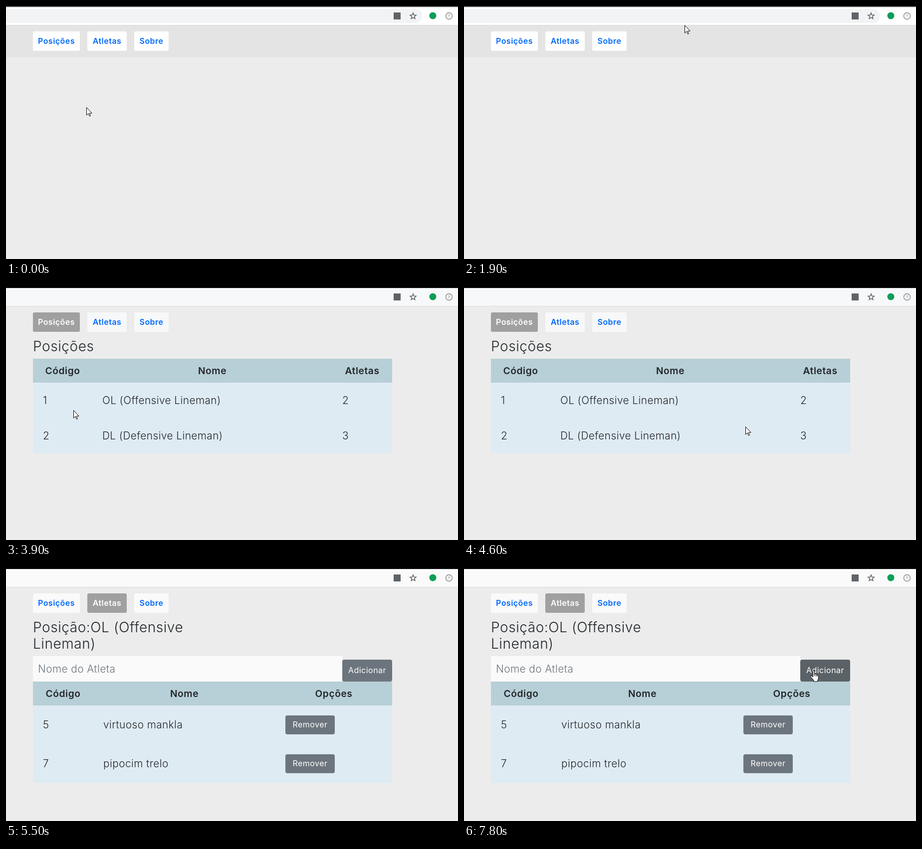
An HTML page that plays this animation: 906 px wide and 508 px high, repeating every 8 s.

```html
<!DOCTYPE html>
<html lang="pt">
<head>
<meta charset="utf-8">
<style>
html, body { margin: 0; width: 100%; height: 100%; overflow: hidden; background: #ececec; }
svg { display: block; }
text { font: 300 20.8px Inter, "Open Sans", sans-serif; letter-spacing: .02em; fill: #212529; }
.title { font-size: 28px; }
.head { font-weight: 600; font-size: 19.2px; letter-spacing: .03em; text-anchor: middle; }
.nav { font-weight: 600; font-size: 16px; letter-spacing: .03em; text-anchor: middle; fill: #0069ff; }
.btn { font-weight: 400; font-size: 16px; letter-spacing: .03em; text-anchor: middle; fill: #fff; }
.hint { fill: #6c757d; }
.help { font-size: 8px; font-weight: 700; letter-spacing: 0; text-anchor: middle; fill: #9e9e9e; }
</style>
</head>
<body>
<svg width="906" height="508" viewBox="0 0 906 508">
  <rect width="906" height="508" fill="#ececec"/>
  <rect id="bar" width="906" height="38"/>
  <rect id="pill" x="-20" y="6" width="854" height="28" rx="14" fill="#f1f3f4"/>
  <rect id="edge" width="906" height="2"/>
  <rect y="38" width="906" height="1" fill="#dadbdc"/>
  <rect x="777" y="13" width="14" height="14" fill="#5f6368"/>
  <path id="star" fill="none" stroke="#5f6368" stroke-width="1.5"/>
  <circle cx="855.5" cy="19.5" r="7" fill="#0f9d58"/>
  <circle cx="888" cy="20" r="6.5" fill="none" stroke="#9e9e9e" stroke-width="1.8"/>
  <text x="888" y="23" class="help">?</text>
  <rect id="band" y="39" width="906" height="64" fill="#e4e4e4"/>
  <g id="nav"></g>
  <g id="positions"></g>
  <g id="athletes"></g>
  <g id="arrow" fill="#fff" stroke="#000">
    <path d="M.5.8v15.4l3.6-3.4 2.4 5.6 2-.9-2.3-5.3h5z"/>
  </g>
  <g id="hand" fill="#fff" stroke="#000" stroke-linejoin="round">
    <path d="M5.5 14V2a1.5 1.5 0 0 1 3 0v6q1.8-1 3 .8 1.8-.7 2.6 1 2.2-.2 2.4 1.5v5q0 2-1.5 3.5v3.2h-8v-2.5L.8 13.5q-.6-2 1.2-2 1.5.3 3.5 2.5z"/>
    <path d="M8.5 8v4M11.5 9v3.5M14 10v3" fill="none"/>
  </g>
</svg>
<script>
const $ = id => document.getElementById(id);
const rect = (x, y, w, h, fill, more = '') =>
  `<rect x="${x}" y="${y}" width="${w}" height="${h}" fill="${fill}" ${more}/>`;
const text = (x, y, s, cls = '') => `<text x="${x}" y="${y}" class="${cls}">${s}</text>`;
const button = (x, y, w, h, label, base, id = '') =>
  rect(x, y, w, h, '#6c757d', `rx="4" id="${id}"`) + text(x + w / 2, base, label, 'btn');

const starPoint = (_, i) => {
  const r = i % 2 ? 2.8 : 6.4, a = i * Math.PI / 5;
  return [816 + r * Math.sin(a), 20.3 - r * Math.cos(a)];
};
$('star').setAttribute('d', 'M' + Array.from({ length: 10 }, starPoint).join('L') + 'z');

const tabs = [[54, 94, 'Posições'], [163, 79, 'Atletas'], [257, 69, 'Sobre']];
$('nav').innerHTML = tabs.map(([x, w, label]) =>
  rect(x, 51, w, 39, '#fff', 'rx="3"') + text(x + w / 2, 76, label, 'nav')).join('');

const table = (y, h) => rect(54, y + 48, 720, h, '#dfebf3') + rect(54, y, 720, 48, '#b7cfd6');
const heads = (y, labels, xs) => labels.map((s, i) => text(xs[i], y, s, 'head')).join('');
const positionRow = (y, code, name, count) => text(74, y, code) + text(193, y, name) + text(674, y, count);
const athleteRow = (y, code, name) =>
  text(74, y, code) + text(195, y, name) + button(560, y - 26, 99, 38, 'Remover', y - 2);

// Columns spread differently while the table is still empty
const labels = ['Código', 'Nome', 'Atletas'];
$('positions').innerHTML = text(54, 129, 'Posições', 'title') +
  '<g id="empty">' + table(144, 0) + heads(175, labels, [179, 415, 651]) + '</g>' +
  '<g id="filled">' + table(144, 142) + heads(175, labels, [113.5, 413.5, 714]) +
  positionRow(235, 1, 'OL (Offensive Lineman)', 2) +
  positionRow(306, 2, 'DL (Defensive Lineman)', 3) + '</g>';

$('athletes').innerHTML = text(54, 129, 'Posição:OL (Offensive', 'title') +
  text(54, 162, 'Lineman)', 'title') +
  rect(54, 177, 620, 51, '#fafafa') + text(64, 210, 'Nome do Atleta', 'hint') +
  button(674, 184, 100, 44, 'Adicionar', 211, 'add') + table(228, 156) +
  heads(259, ['Código', 'Nome', 'Opções'], [114.5, 357.5, 657]) +
  athleteRow(322, 5, 'virtuoso mankla') + athleteRow(400, 7, 'pipocim trelo');

// Pointer path: time in tenths of a second, x, y
const path = [
  [6, 161, 203], [7, 102, 122], [8, 102, 122], [10, 86, 125], [14, 582, 120], [17, 440, 93],
  [18, 440, 93], [19, 442, 38], [22, 133, 94], [23, 133, 94], [26, 93, 79], [28, 94, 78],
  [34, 94, 78], [35, 61, 68], [39, 135, 247], [43, 217, 262], [44, 300, 300], [47, 696, 270],
  [48, 600, 171], [50, 345, 230], [51, 345, 230], [53, 351, 223], [57, 351, 223], [58, 345, 228],
  [66, 94, 356], [68, 330, 407], [70, 605, 345], [72, 545, 284], [73, 620, 212], [74, 620, 212],
  [75, 690, 210], [78, 700, 205]
];
function pointer(k) {
  const i = Math.max(1, path.findIndex(p => p[0] >= k));
  const [a, ax, ay] = path[i - 1], [b, bx, by] = path[i];
  const u = Math.max(0, (k - a) / (b - a));
  return [Math.round(ax + (bx - ax) * u), Math.round(ay + (by - ay) * u)];
}

const inside = (x, y, l, t, w, h) => x >= l && x < l + w && y >= t && y < t + h;
const show = (id, on) => $(id).style.display = on ? '' : 'none';

function draw(now) {
  const k = Math.floor(now % 8000 / 100);
  const page = k < 32 ? 0 : k < 55 ? 1 : 2;
  const tone = ['#fff', '#f7f8f9', '#fafafa'][page];

  $('bar').setAttribute('fill', tone);
  $('edge').setAttribute('fill', k < 31 ? '#424242' : '#000');
  show('pill', page === 0);
  show('band', page === 0);
  show('positions', page === 1);
  show('empty', k < 35);
  show('filled', k >= 35);
  show('athletes', page === 2);
  tabs.forEach((tab, i) => {
    const active = i === page - 1, [box, label] = [0, 1].map(n => $('nav').children[i * 2 + n]);
    box.setAttribute('fill', active ? '#a0a0a0' : tone);
    label.style.fill = active ? '#fff' : '';
  });

  const [x, y] = pointer(Math.min(k, 78));
  const onAdd = page === 2 && inside(x, y, 674, 184, 100, 44);
  const onInput = page === 2 && inside(x, y, 54, 177, 620, 51);
  const onLink = onAdd || tabs.some(([l, w]) => inside(x, y, l, 51, w, 39)) ||
    page === 1 && k >= 35 && [215, 286].some(t => inside(x, y, 193, t, 247, 27));
  $('add').setAttribute('fill', onAdd ? '#5a6268' : '#6c757d');
  show('hand', onLink);
  show('arrow', !onLink && !onInput);
  $('hand').setAttribute('transform', `translate(${x - 6} ${y})`);
  $('arrow').setAttribute('transform', `translate(${x} ${y})`);
}

const start = performance.now();
function tick() {
  draw(performance.now() - start);
  requestAnimationFrame(tick);
}
tick();
</script>
</body>
</html>
```
